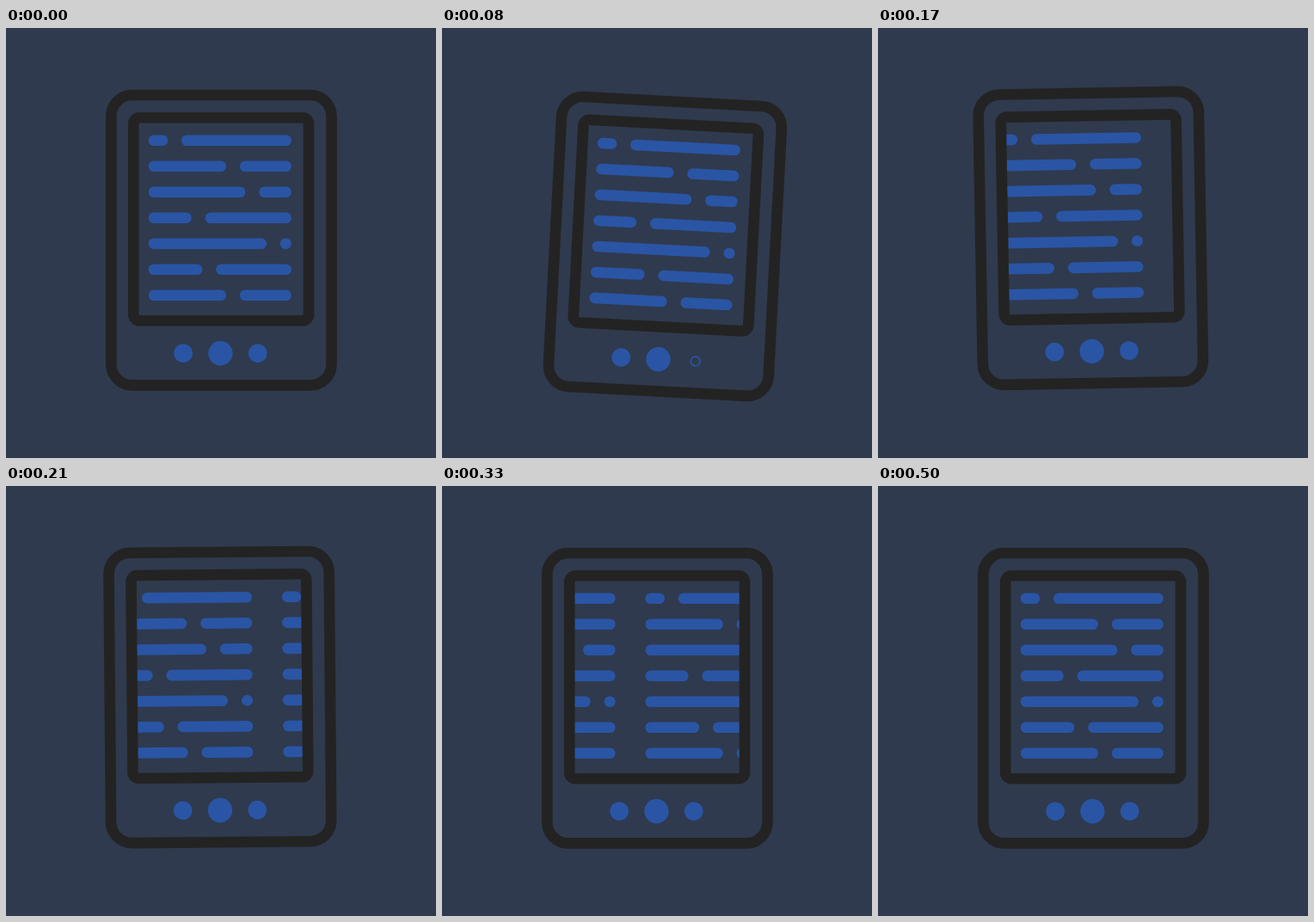
An HTML page for the animation above (0.54 s loop, 500x500 px).

```html
<!DOCTYPE html>
<html lang="en">
<head>
<meta charset="utf-8">
<title>E-reader page turn</title>
<style>
  html, body { margin: 0; width: 100%; height: 100%; overflow: hidden; background: #2f3a4e; }
  svg { display: block; width: 100%; height: 100%; }
  .frame { fill: none; stroke: #232323; stroke-width: 12.6; }
  .dot { fill: #2a55a5; }
  .line { stroke: #2a55a5; stroke-width: 12.6; stroke-linecap: round; }
  #button { fill: none; stroke: #2a55a5; }
</style>
</head>
<body>
<svg viewBox="0 0 500 500">
  <defs>
    <clipPath id="screen"><rect x="150" y="106" width="200" height="232"/></clipPath>
  </defs>
  <g id="device">
    <g clip-path="url(#screen)"><g id="pages"></g></g>
    <rect class="frame" x="122.3" y="78" width="256.2" height="337.4" rx="24.5"/>
    <rect class="frame" x="148.2" y="104.3" width="203.8" height="236" rx="7"/>
    <circle class="dot" cx="206.1" cy="378.2" r="10.8"/>
    <circle class="dot" cx="249.4" cy="378.2" r="14.2"/>
    <circle id="button" cx="292.7" cy="378.2" r="5.4"/>
  </g>
</svg>
<script>
const LOOP = 540, STEP = 1000 / 24, PAGE = 201;
const LEFT = 165.7, RIGHT = 331.9, GAP = 15.8, CAP = 6.3;
const splits = [188.2, 256, 278.4, 215.8, 303, 228.4, 256];
const get = id => document.getElementById(id);
const device = get('device'), pages = get('pages'), button = get('button');

function addLine(from, to, y) {
  const line = document.createElementNS('http://www.w3.org/2000/svg', 'line');
  const ends = { class: 'line', x1: from + CAP, x2: Math.max(to - CAP, from + CAP + 0.01), y1: y, y2: y };
  for (const key in ends) line.setAttribute(key, ends[key]);
  pages.append(line);
}

for (const shift of [0, PAGE]) {
  splits.forEach((split, row) => {
    const y = 130.7 + row * 30.02;
    addLine(LEFT + shift, split + shift, y);
    addLine(split + GAP + shift, RIGHT + shift, y);
  });
}

// Eased progress from step a to step b
function ease(step, a, b) {
  const u = Math.min(1, Math.max(0, (step - a) / (b - a)));
  return u * u * (3 - 2 * u);
}

function draw(ms) {
  // 24 steps per second, each starting on a 10 ms tick
  const tick = Math.floor((ms % LOOP) / 10) * 10;
  const step = Math.floor((tick + 4.9) / STEP);

  const tilt = 3 * ease(step, 0, 2) - 4 * ease(step, 2, 4) + ease(step, 4, 6);
  const press = ease(step, 0, 2) - ease(step, 2, 4);
  const scroll = PAGE * ease(step, 2, 12);

  device.setAttribute('transform', `rotate(${tilt} 116 421.5)`);
  pages.setAttribute('transform', `translate(${-scroll} 0)`);
  button.setAttribute('stroke-width', 10.8 - 9.2 * press);
}

const start = performance.now();
function tickFrame() {
  draw(performance.now() - start);
  requestAnimationFrame(tickFrame);
}
tickFrame();
</script>
</body>
</html>
```
